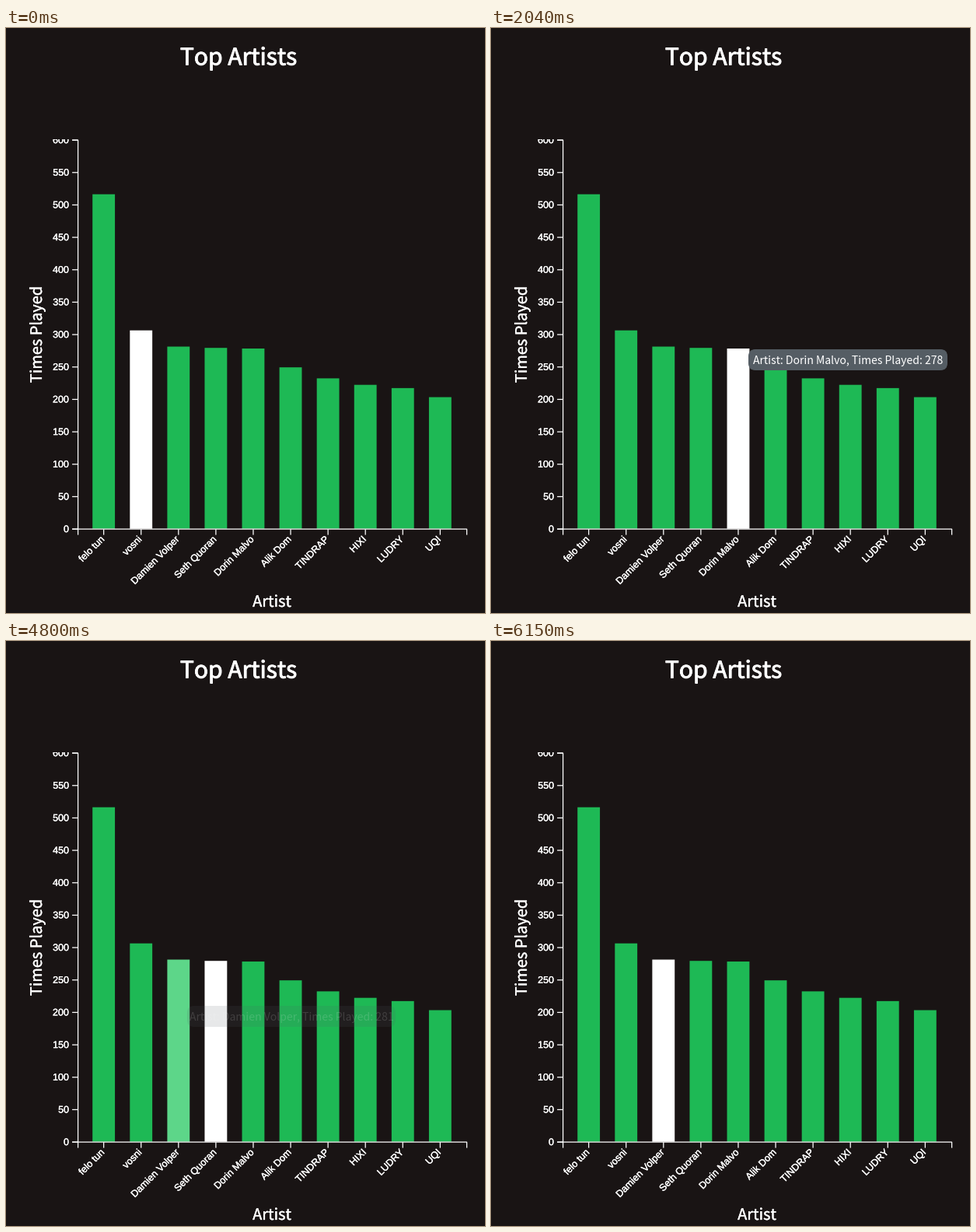
A matplotlib script that plays this animation: 616x752 px, repeating every 7.05 s.

```python
import matplotlib.pyplot as plt
from matplotlib.animation import FuncAnimation
from matplotlib.colors import to_rgb
from matplotlib.patches import FancyBboxPatch, Rectangle
from matplotlib.patheffects import withStroke

W, H, DPI = 616, 752, 64
LOOP, STEP = 7050, 30
PT = 72 / DPI  # points per pixel

BACK, GREEN, LIGHT, WHITE = "#191414", "#1eb955", "#5dd689", "#ffffff"
TIP_BACK, TIP_DIM = "#555d64", "#f0f2f3"
SANS, HUMANIST = "Liberation Sans", "Noto Sans CJK JP"

DATA = [("felo tun", 516), ("vosni", 306), ("Damien Volper", 281),
        ("Seth Quoran", 279), ("Dorin Malvo", 278), ("Alik Dom", 249),
        ("TINDRAP", 232), ("HIXI", 222), ("LUDRY", 217), ("UQI", 203)]

# plot geometry in pixels
LEFT, BASE, SIZE, TOP_VALUE = 92, 643.7, 500, 600
BAND = SIZE / (len(DATA) + 0.4)
BAR_W = 0.6 * BAND
AXIS_X, AXIS_Y = LEFT + 0.6, BASE + 0.4
CHART_TOP = 143

# hover start, bar, tooltip box (x, y, width)
HOVERS = [(1140, 4, (331, 413, 256)),
          (2970, 3, (281, 463, 254)),
          (4800, 2, (233, 469, 268))]
# click time, bar, start and end of the fade to white
CLICKS = [(0, 1, -2, -1), (1800, 4, 1840, 2050),
          (3780, 3, 3820, 4030), (5340, 2, 5385, 5530)]


def ease(t, start, end):
    u = min(max((t - start) / (end - start), 0), 1)
    return 4 * u ** 3 if u < 0.5 else 1 - 4 * (1 - u) ** 3


def mix(a, b, u):
    return tuple(p + (q - p) * u for p, q in zip(to_rgb(a), to_rgb(b)))


def latest(events, t):
    past = [e for e in events if e[0] <= t]
    return past[-1] if past else None


fig = plt.figure(figsize=(W / DPI, H / DPI), dpi=DPI, facecolor=BACK)
ax = fig.add_axes([0, 0, 1, 1])
ax.set_xlim(0, W)
ax.set_ylim(H, 0)
ax.axis("off")


def label(x, y, text, size, font=SANS, weight=0.3, **kw):
    """Text on a baseline; weight is an extra outline in pixels."""
    kw = {"ha": "center", "va": "baseline", "color": WHITE,
          "rotation_mode": "anchor", "zorder": 4, **kw}
    if weight:
        kw["path_effects"] = [withStroke(linewidth=weight * PT,
                                         foreground=WHITE)]
    return ax.text(x, y, text, fontsize=size * PT, family=font, **kw)


def line(xs, ys):
    ax.plot(xs, ys, color=WHITE, lw=1.25 * PT, snap=False, zorder=3,
            solid_capstyle="butt", solid_joinstyle="miter")


def draw_axes():
    end = AXIS_X + SIZE
    line([AXIS_X - 7.5, AXIS_X, AXIS_X, AXIS_X - 7.5],
         [AXIS_Y, AXIS_Y, AXIS_Y - SIZE, AXIS_Y - SIZE])
    line([AXIS_X, AXIS_X, end, end],
         [AXIS_Y + 7.5, AXIS_Y, AXIS_Y, AXIS_Y + 7.5])
    # the top tick label is cut by the edge of the chart
    edge = Rectangle((0, H), W, CHART_TOP - H, transform=ax.transData)
    for value in range(0, TOP_VALUE + 1, 50):
        y = AXIS_Y - value * SIZE / TOP_VALUE
        line([AXIS_X - 7.5, AXIS_X], [y, y])
        text = label(LEFT - 11, y + 4, str(value), 12.5, ha="right",
                     clip_on=True)
        text.set_clip_path(edge)
    for i, (name, _) in enumerate(DATA):
        x = LEFT + (i + 0.7) * BAND
        line([x, x], [AXIS_Y, AXIS_Y + 7.5])
        label(x + 1.7, BASE + 14.2, name, 12.5, ha="right", rotation=45)


def make_bar(i, value):
    height = value * SIZE / TOP_VALUE
    bar = Rectangle((LEFT + (i + 0.4) * BAND, BASE - height),
                    BAR_W, height, fc=GREEN, lw=0, snap=False, zorder=2)
    return ax.add_patch(bar)


def make_tip(i, box):
    x, y, width = box
    name, value = DATA[i]
    patch = FancyBboxPatch((x, y), width, 27, fc=TIP_BACK, lw=0, zorder=5,
                           boxstyle="round,pad=0,rounding_size=9")
    ax.add_patch(patch)
    text = label(x + width / 2, y + 19,
                 f"Artist: {name}, Times Played: {value}",
                 14, HUMANIST, weight=0, zorder=6)
    return patch, text


label(299, 47.5, "Top Artists", 30, HUMANIST, weight=0.9)
label(342, 744, "Artist", 20, HUMANIST)
label(46, 394, "Times Played", 20, HUMANIST, rotation=90)
draw_axes()
bars = [make_bar(i, value) for i, (_, value) in enumerate(DATA)]
tips = {i: make_tip(i, box) for _, i, box in HOVERS}


def tip_alpha(t):
    if t < 4800:
        return ease(t, 1140, 1400) * (1 - ease(t, 4620, 4870))
    return (0.14 + 0.86 * ease(t, 4800, 5060)) * (1 - ease(t, 5905, 6150))


def update(frame):
    t = frame * STEP
    hover, click = latest(HOVERS, t), latest(CLICKS, t)
    for bar in bars:
        bar.set_facecolor(GREEN)
    if hover and t < 5900:
        bars[hover[1]].set_facecolor(LIGHT)
    _, i, start, end = click
    bars[i].set_facecolor(mix(LIGHT, WHITE, ease(t, start, end)))

    alpha = tip_alpha(t)
    for i, (patch, text) in tips.items():
        shown = bool(hover) and hover[1] == i and alpha > 0.002
        for part in (patch, text):
            part.set_visible(shown)
            part.set_alpha(alpha)
        text.set_color(TIP_DIM if 2970 <= t < 3270 else WHITE)
    return bars


anim = FuncAnimation(fig, update, frames=LOOP // STEP, interval=STEP,
                     init_func=lambda: update(0), repeat=True,
                     repeat_delay=0, blit=False)
plt.show()
```
